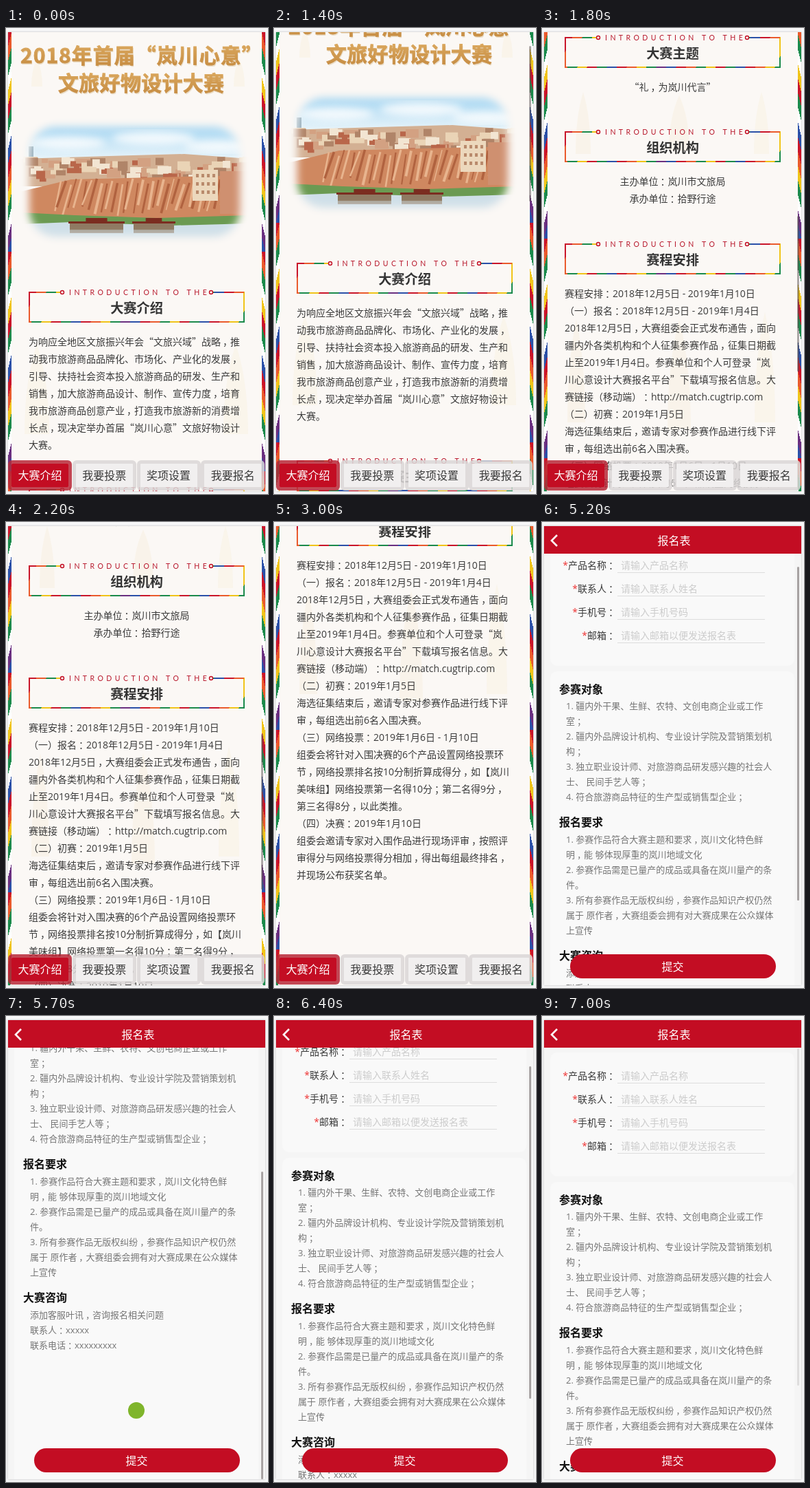
An HTML page that plays this animation: 382x677 px, repeating every 8 s.

```html
<!DOCTYPE html>
<html lang="zh-CN">
<head>
<meta charset="utf-8">
<title>大赛</title>
<style>
html, body { margin: 0; width: 100%; height: 100%; overflow: hidden; background: #f8f8f9; }
body { font-family: "Open Sans", "Noto Sans CJK SC", "Noto Sans CJK", sans-serif; color: #3a3a3a; text-spacing-trim: space-all; }
div, svg { position: absolute; left: 0; top: 0; white-space: pre; }
i { font-family: "Noto Sans CJK SC", "Noto Sans CJK", sans-serif; font-style: normal; line-height: 0; }
u { position: relative; left: .22em; text-decoration: none; }
#edge { left: 3px; top: 6px; width: 375px; height: 667px; box-shadow: 0 0 3px #bbb; }
#phone { width: 382px; height: 677px; overflow: hidden; clip-path: inset(6px 4px 4px 3px); background: #fbf8f5; }
#page, #list, #form { width: 382px; }
#form { height: 677px; background: #f5f5f5; }
.side { top: 6px; width: 5px; height: 1700px; background-size: 5px 319px; }
.text { font-size: 14px; line-height: 25px; margin-top: -12.5px; }
.mid { width: 375px; text-align: center; }
.head { font-size: 19.2px; line-height: 30px; margin-top: -15px; font-weight: 700; color: #333; }
.tab { top: 628px; width: 83px; height: 34px; border: 5px solid rgba(218,214,214,.85); border-radius: 6px;
  background: #f1efef padding-box; font-size: 16px; line-height: 34px; text-align: center; }
.tab.on { background: #c30d23 padding-box; border-color: rgba(184,40,56,.85); color: #fff; }
.card { left: 12px; width: 356px; border-radius: 10px; background: #f9f9f9; }
.sub { font-size: 16px; line-height: 24px; margin-top: -12px; font-weight: 700; color: #111; }
.item { font-size: 13px; line-height: 22px; margin-top: -11px; color: #757575; }
.label { width: 108px; text-align: right; }
.label b { color: #e33; font-weight: 400; }
.hint { color: #ccc; }
.rule { left: 110px; width: 215px; height: 1px; background: #ddd; }
.bar { width: 382px; height: 46px; background: #c30d23; }
.white { font-size: 16px; line-height: 24px; margin-top: -12px; color: #fff; }
.send { left: 41px; top: 628px; width: 300px; height: 35px; border-radius: 18px; background: #c30d23; }
#thumb { left: 372px; width: 3px; border-radius: 2px; background: rgba(90,80,80,.5); }
</style>
</head>
<body>
<div id="edge"></div>
<div id="phone"></div>
<script>
const $ = id => document.getElementById(id);
const range = n => [...Array(n).keys()];
let seed = 7;
const rnd = (a, b) => a + (b - a) * ((seed = seed * 16807 % 2147483647) / 2147483647);

const silk = ['#c9152a', '#ea5a2c', '#1b8a4b', '#fff', '#f0c419', '#c9152a', '#1b8a4b', '#fff',
  '#2b50a8', '#c9152a', '#ea5a2c', '#f0c419', '#1b8a4b', '#fff', '#6a2f80', '#2b50a8'];
const bands = silk.map((c, k) => `${c} ${k * 6.25}% ${(k + 1) * 6.25}%`).join();
const silkStops = silk.filter(c => c !== '#fff').map((c, k, all) =>
  [k, k + 1].map(n => `<stop offset="${n / all.length}" stop-color="${c}"/>`).join('')).join('');

// Quotes and dashes take the full-width face; commas and colons sit mid-cell.
const wide = s => s.replace(/[“”—]+/g, '<i>$&</i>').replace(/[，：；]/g, '<u>$&</u>');
const put = (cls, x, y, s = '') => `<div class="${cls}" style="left:${x}px;top:${y}px">${wide(s)}</div>`;
const rect = (x, y, w, h, c, more = '') => `<rect x="${x}" y="${y}" width="${w}" height="${h}" fill="${c}" ${more}/>`;

function section(y, title, body, centred) {
  return `<svg style="left:33px;top:${y - 6}px" width="316" height="54" fill="none">
    <path d="M46 7H1V50H314V7H269" stroke="url(#silk)" stroke-width="2"/>
    <g stroke="#c30d23" stroke-width="1.4"><circle cx="49" cy="7" r="2.5"/><circle cx="266" cy="7" r="2.5"/></g>
    <text x="59" y="11" fill="#b8182c" font-family="Lato, sans-serif" font-size="10.5" letter-spacing="4.45" word-spacing=".5">INTRODUCTION TO THE</text></svg>`
    + put('head mid', 3, y + 24, title) + put(centred ? 'text mid' : 'text', centred ? 3 : 33, y + 72, body);
}

function photo() {
  const walls = ['#ead4b6', '#d3a182', '#b9664a', '#f2e5d2', '#b08468'];
  const town = range(75).map(k => {
    const y = rnd(187, 214);
    return rect(25 + k * 37 % 325, y, rnd(8, 22), rnd(6, 14), walls[k % 5]);
  }).join('');
  const ridges = range(34).map(k => {
    const x = 80 + k * 7.5, y = rnd(218, 228);
    return `<path d="M${x} ${y}l${rnd(-14, -6)} ${rnd(36, 46)}" stroke="${k % 2 ? '#b0623f' : '#e8b48e'}" stroke-width="${rnd(1.5, 4)}"/>`;
  }).join('');
  const windows = range(12).map(k => rect(277 + k % 4 * 8, 212 + (k >> 2) * 12, 4, 5, '#b98a6c')).join('');
  const hut = (x, w) => rect(x, 284, w, 9, '#8f7a62') + rect(x - 2, 281, w + 4, 3, '#7b2d20')
    + rect(x + w * .3, 276, w * .4, 5, '#7b2d20') + rect(x, 293, w, 5, '#a9a49a');
  return `<g mask="url(#fade)">${rect(20, 130, 335, 100, 'url(#sky)')}
    <g fill="#fff" opacity=".8" filter="url(#soft)"><ellipse cx="90" cy="167" rx="55" ry="9"/><ellipse cx="215" cy="160" rx="60" ry="10"/><ellipse cx="310" cy="172" rx="50" ry="8"/></g>
    <path d="M20 190L150 186L260 183L355 190V230H20Z" fill="#d3b093"/>${rect(33, 172, 7, 16, '#8fa9b8')}${town}
    <path d="M20 238L95 220L260 216L355 214V285H20Z" fill="#cf8860"/>${ridges}
    ${rect(272, 206, 37, 45, '#ecd8bd')}${windows}${rect(312, 208, 40, 62, '#cf9070')}
    <path d="M20 268L100 272L220 276L355 272V310H20Z" fill="#6b9a52"/>
    <path d="M20 285L95 282L240 287L355 284V315H20Z" fill="#cfdfe8"/>${hut(93, 78)}${hut(186, 59)}</g>`;
}

// Pale spires behind the text
const spire = (x, y, w, h) => `<path d="M${x - w} ${y}Q${x - w} ${y - h * .6} ${x} ${y - h}Q${x + w} ${y - h * .6} ${x + w} ${y}Z"/>`;
const spires = [[45, 85, 8, 40], [340, 85, 8, 40], [45, 590, 18, 130], [335, 590, 18, 130],
  [60, 840, 11, 90], [200, 835, 15, 80], [320, 840, 11, 90], [50, 1230, 13, 150], [200, 1240, 17, 160], [325, 1230, 15, 160]];
const titles = (dx, dy) => `<text x="${21 + dx}" y="${51 + dy}">2018年首届“岚川心意”</text><text x="${76 + dx}" y="${91 + dy}" letter-spacing=".3">文旅好物设计大赛</text>`;

const hero = `<svg width="382" height="1700"><defs>
  <linearGradient id="silk" gradientUnits="userSpaceOnUse" x1="0" y1="0" x2="150" y2="75" spreadMethod="repeat">${silkStops}</linearGradient>
  <linearGradient id="gold" x2="0" y2="1"><stop stop-color="#dfae64"/><stop offset="1" stop-color="#c4893f"/></linearGradient>
  <linearGradient id="sky" x2="0" y2="1"><stop stop-color="#93cdef"/><stop offset=".65" stop-color="#eef7fb"/></linearGradient>
  <filter id="soft"><feGaussianBlur stdDeviation="6"/></filter>
  <mask id="fade">${rect(34, 144, 307, 159, '#fff', 'rx="38" filter="url(#soft)"')}</mask></defs>
  <g fill="#f5e6c6" opacity=".22">${spires.map(d => spire(...d)).join('')}</g>
  <g font-family="Noto Sans CJK SC, Noto Sans CJK, sans-serif" font-weight="900" font-size="30" letter-spacing="1">
  <g fill="#eadcc6">${titles(1, 2)}</g><g fill="url(#gold)" stroke="url(#gold)" stroke-width=".8">${titles(0, 0)}</g></g>
  ${photo()}</svg>`;

const intro = section(383, '大赛介绍', `为响应全地区文旅振兴年会“文旅兴域”战略，推
动我市旅游商品品牌化、市场化、产业化的发展，
引导、扶持社会资本投入旅游商品的研发、生产和
销售，加大旅游商品设计、制作、宣传力度，培育
我市旅游商品创意产业，打造我市旅游新的消费增
长点，现决定举办首届“岚川心意”文旅好物设计
大赛。`)
+ section(670, '大赛主题', '“礼，为岚川代言”', true)
+ section(807, '组织机构', '主办单位：岚川市文旅局\n承办单位：拾野行途', true)
+ section(970, '赛程安排', `赛程安排：2018年12月5日 - 2019年1月10日
（一）报名：2018年12月5日 - 2019年1月4日
2018年12月5日，大赛组委会正式发布通告，面向
疆内外各类机构和个人征集参赛作品，征集日期截
止至2019年1月4日。参赛单位和个人可登录“岚
川心意设计大赛报名平台”下载填写报名信息。大
赛链接（移动端）：http://match.cugtrip.com
（二）初赛：2019年1月5日
海选征集结束后，邀请专家对参赛作品进行线下评
审，每组选出前6名入围决赛。
（三）网络投票：2019年1月6日 - 1月10日
组委会将针对入围决赛的6个产品设置网络投票环
节，网络投票排名按10分制折算成得分，如【岚川
美味组】网络投票第一名得10分；第二名得9分，
第三名得8分，以此类推。
（四）决赛：2019年1月10日
组委会邀请专家对入围作品进行现场评审，按照评
审得分与网络投票得分相加，得出每组最终排名，
并现场公布获奖名单。`);

const award = section(383, '参赛分组', `根据岚川市旅游资源禀赋和文化内涵，本次大赛共
设3组进行比赛，分别为：
（一）岚川美味组——体现和代表岚川特点的干
果、鲜果、民族食品、民族药茶等农副食品及相关
创意制品；
（二）岚川手艺组——民族传统手工艺品或体现鲜
明地域文化元素和创新元素的手工艺品等；
（三）岚川文创组——其他能展现岚川风貌及民俗
文化的创意设计产品等。`);

const fields = [['产品名称', '请输入产品名称'], ['联系人', '请输入联系人姓名'], ['手机号', '请输入手机号码'], ['邮箱', '请输入邮箱以便发送报名表']]
  .map(([name, hint], k) => {
    const y = 86 + 34 * k;
    return put('text label', 0, y, `<b>*</b>${name}：`) + put('text hint', 115, y, hint)
      + `<div class="rule" style="top:${y + 11}px"></div>`;
  }).join('');

const form = `<div id="list"><div class="card" style="top:53px;height:180px"></div><div class="card" style="top:241px;height:720px"></div>`
+ fields
+ put('sub', 25, 267, '参赛对象') + put('item', 35, 291, `1. 疆内外干果、生鲜、农特、文创电商企业或工作
室；
2. 疆内外品牌设计机构、专业设计学院及营销策划机
构；
3. 独立职业设计师、对旅游商品研发感兴趣的社会人
士、 民间手艺人等；
4. 符合旅游商品特征的生产型或销售型企业；`)
+ put('sub', 25, 460, '报名要求') + put('item', 35, 485, `1. 参赛作品符合大赛主题和要求，岚川文化特色鲜
明，能 够体现厚重的岚川地域文化
2. 参赛作品需是已量产的成品或具备在岚川量产的条
件。
3. 所有参赛作品无版权纠纷，参赛作品知识产权仍然
属于 原作者，大赛组委会拥有对大赛成果在公众媒体
上宣传`)
+ put('sub', 25, 654, '大赛咨询') + put('item', 35, 679, '添加客服叶讯，咨询报名相关问题\n联系人：xxxxx\n联系电话：xxxxxxxxx')
+ `<svg style="left:177px;top:805px" width="26" height="26"><circle cx="13" cy="13" r="12" fill="#7fb52b"/></svg></div>
<div class="bar"></div><svg width="40" height="46"><path d="M22 19L14 27L22 35" fill="none" stroke="#fff" stroke-width="2.6"/></svg>`
+ put('white mid', 5, 27, '报名表') + '<div class="send"></div>' + put('white mid', 3, 646, '提交');

const side = (x, angle) => `<div class="side" style="left:${x}px;background-image:linear-gradient(${angle}deg,${bands})"></div>`;
const tabs = ['大赛介绍', '我要投票', '奖项设置', '我要报名']
  .map((s, k) => `<div class="tab" style="left:${3 + 93.75 * k}px">${s}</div>`).join('');

$('phone').innerHTML = `<div id="page">${hero}${side(3, 104)}${side(373, 256)}
  <div id="intro">${intro}</div><div id="award">${award}</div></div>${tabs}<div id="form">${form}</div><div id="thumb"></div>`;

// Piecewise linear value through [time, value] keys.
function track(t, keys) {
  const k = keys.findIndex(key => key[0] > t);
  if (k < 0) return keys[keys.length - 1][1];
  if (!k) return keys[0][1];
  const [a, u] = keys[k - 1], [b, v] = keys[k];
  return u + (v - u) * (t - a) / (b - a);
}

const pageKeys = [[1300, 0], [1400, 42], [1500, 190], [1600, 370], [1700, 540], [1800, 657], [1900, 697],
  [2000, 722], [2100, 737], [2200, 744], [2300, 744], [2400, 880], [2500, 980]];
const formKeys = [[5100, 0], [5200, 24], [5300, 94], [5400, 165], [5500, 215], [5600, 238], [5700, 245],
  [6200, 245], [6300, 150], [6400, 35], [6500, 0]];
const thumbKeys = [[1300, 0], [1400, 1], [2700, 1], [3000, 0], [3900, 0], [4000, 1], [4100, 1], [4500, 0],
  [5100, 0], [5200, 1], [5900, 1], [6100, 0], [6200, 0], [6300, 1], [6800, 1], [7000, .3]];
const tabList = document.querySelectorAll('.tab');
const start = performance.now();

function draw() {
  const t = Math.floor((performance.now() - start) % 8000 / 100) * 100;
  const onAward = t >= 4000, onForm = t >= 4800;
  const scroll = onForm ? track(t, formKeys) : onAward ? 0 : track(t, pageKeys);
  $('intro').hidden = onAward;
  $('award').hidden = !onAward;
  $('form').hidden = !onForm;
  tabList.forEach((tab, k) => tab.classList.toggle('on', k === (onAward ? 2 : 0)));
  $(onForm ? 'list' : 'page').style.transform = `translateY(${-Math.round(scroll)}px)`;
  if (onAward) $('page').style.transform = 'none';
  const thumb = $('thumb').style;
  thumb.top = (onForm ? 47 + 179 * scroll / 245 : 9 + 394 * scroll / 980) + 'px';
  thumb.height = (onForm ? 490 - 43 * scroll / 245 : 226) + 'px';
  thumb.opacity = track(t, thumbKeys);
  requestAnimationFrame(draw);
}
draw();
</script>
</body>
</html>
```
